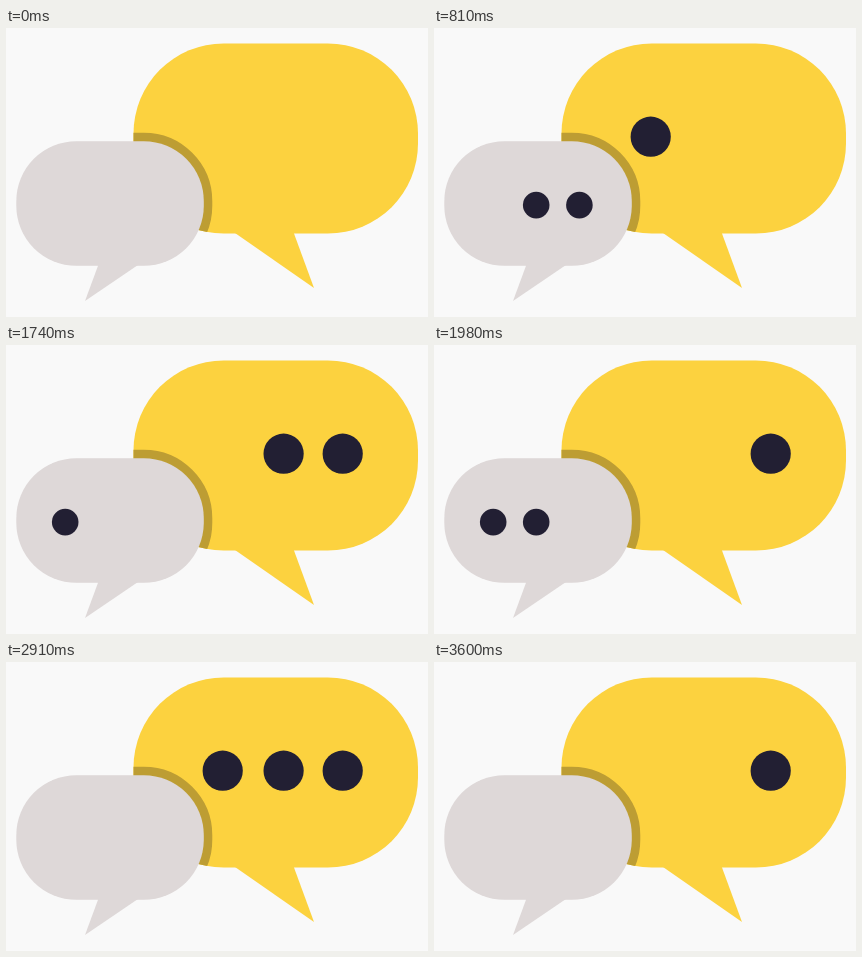
Write an HTML page that moves like this. It is 422 px wide and 289 px high and loops after 3.87 s.

```html
<!DOCTYPE html>
<html lang="en">
<head>
<meta charset="utf-8">
<title>Chat bubbles</title>
<style>
  html, body { margin: 0; width: 100%; height: 100%; overflow: hidden; background: #f9f9f9; }
  svg { display: block; width: 100%; height: 100%; }
  .yellow { fill: #fcd23f; }
  .grey { fill: #ded8d8; }
  .shadow { fill: none; stroke: #bd9d33; stroke-width: 17; }
  #dots { fill: #221f33; }
</style>
</head>
<body>
<svg viewBox="0 0 422 289">
  <defs>
    <rect id="large" x="127.5" y="15.5" width="284.5" height="190" rx="90"/>
    <rect id="small" x="10.3" y="113.3" width="187.5" height="124.5" rx="60"/>
    <clipPath id="inLarge"><use href="#large"/></clipPath>
  </defs>
  <g class="yellow">
    <use href="#large"/>
    <path d="M229 205H287.8L308 260Z"/>
  </g>
  <g clip-path="url(#inLarge)"><use href="#small" class="shadow"/></g>
  <g class="grey">
    <use href="#small"/>
    <path d="M92.3 237H132L79 273Z"/>
  </g>
  <g id="dots"></g>
</svg>
<script>
  const LOOP = 3870;
  const SMALL = { y: 177.1, r: 13.3 };
  const LARGE = { y: 108.7, r: 20.1 };

  // Each dot is visible during its [start, end) spans, in ms.
  const dots = [
    { ...SMALL, x: 59.2, spans: [[150, 810], [1740, 2400]] },
    { ...SMALL, x: 102.2, spans: [[360, 1050], [1980, 2670]] },
    { ...SMALL, x: 145.4, spans: [[570, 1260], [2220, 2910]] },
    { ...LARGE, x: 216.7, spans: [[810, 1740], [2400, 3330]] },
    { ...LARGE, x: 277.6, spans: [[1050, 1980], [2670, 3600]] },
    { ...LARGE, x: 336.7, spans: [[1260, 2220], [2910, 3870]] },
  ];

  const group = document.getElementById('dots');
  for (const dot of dots) {
    dot.circle = document.createElementNS('http://www.w3.org/2000/svg', 'circle');
    dot.circle.setAttribute('cx', dot.x);
    dot.circle.setAttribute('cy', dot.y);
    dot.circle.setAttribute('r', dot.r);
    group.append(dot.circle);
  }

  const startTime = performance.now();

  function draw() {
    const time = (performance.now() - startTime) % LOOP;
    for (const { circle, spans } of dots) {
      const visible = spans.some(([start, end]) => time >= start && time < end);
      circle.setAttribute('visibility', visible ? 'visible' : 'hidden');
    }
    requestAnimationFrame(draw);
  }
  draw();
</script>
</body>
</html>
```
